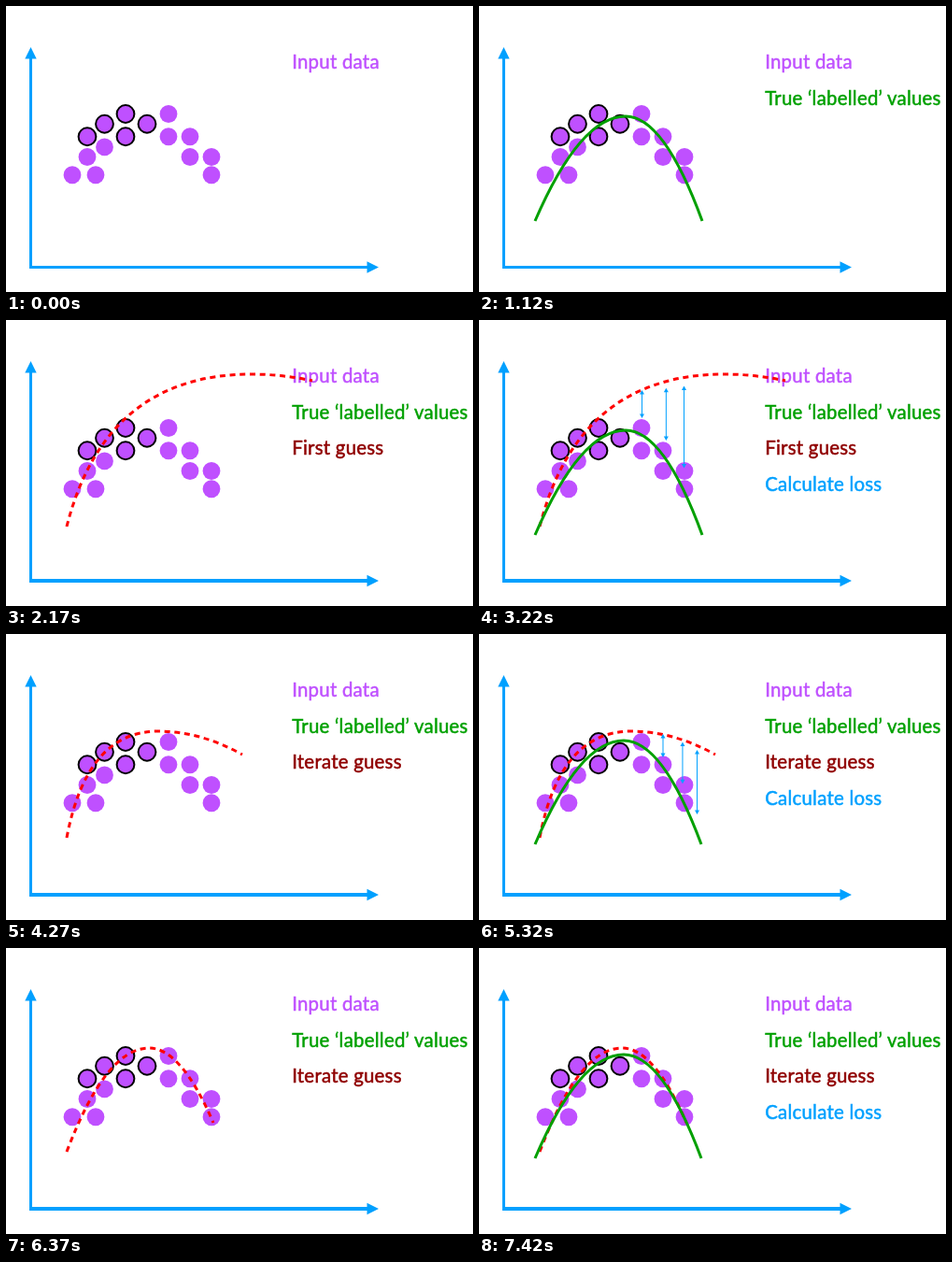
Write an HTML page that moves like this. It is 500 px wide and 306 px high and loops after 8.54 s.

```html
<!DOCTYPE html>
<html lang="en">
<head>
<meta charset="utf-8">
<title>Fitting a curve</title>
<style>
  html, body { margin: 0; width: 100%; height: 100%; overflow: hidden; background: #fff; }
  svg { display: block; width: 100vw; height: 100vh; }
  text { font: 20.4px Lato, sans-serif; letter-spacing: .25px; stroke-width: .5; }
  .curve { fill: none; stroke-width: 3; }
  .guess { stroke: #f00; stroke-dasharray: 6 4.7; }
  .truth { stroke: #00a000; }
</style>
</head>
<body>
<svg id="stage" viewBox="0 0 500 306"></svg>
<script>
const stage = document.getElementById('stage');
const purple = '#bf50ff', green = '#00a000', maroon = '#8f0000', blue = '#00a0ff';
const loop = 8540, stepTime = 1050, lastStep = 7;

const mix = (a, b, t) => a + (b - a) * t;

// Two parabolic halves meeting at the peak; a small lean makes the rise steeper.
function arch([x0, y0], [peakX, peakY], [x1, y1], lean = .5) {
  return `M${x0} ${y0}Q${mix(x0, peakX, lean)} ${peakY} ${peakX} ${peakY}` +
    `Q${mix(peakX, x1, .5)} ${peakY} ${x1} ${y1}`;
}

const truths = [
  arch([60, 230], [157, 118], [239, 230]),
  arch([60, 225], [155, 114], [238, 225])
];
const rounds = [
  { label: 'First guess', guess: arch([65, 221], [263, 58], [328, 65], .21),
    loss: { x: [174.5, 219.5], top: [75, 70.5], length: [30, 88] } },
  { label: 'Iterate guess', guess: arch([65, 218], [163, 104], [253, 129], .22),
    loss: { x: [197, 233.5], top: [107, 124], length: [25, 69] } },
  { label: 'Iterate guess', guess: arch([65, 218], [153, 107], [222, 187], .48) }
];

function dot(x, level) {
  const y = 115.5 + 25.5 * level - 1.25 * level ** 2;
  const outline = x > 80 && x < 160 && y < 145 ? 'stroke="#000" stroke-width="2"' : '';
  return `<circle cx="${x}" cy="${y}" r="9.4" fill="${purple}" ${outline}/>`;
}

// Each column: x, then the levels of its dots
const columns = [[71, 3], [87, 2, 1], [96, 3], [105.5, 1.5, .43], [128, 0, 1], [151, .43]];
for (let i = 0; i < 3; i++) columns.push([174 + 23 * i, i, i + 1]);
const dots = columns.flatMap(([x, ...levels]) => levels.map(level => dot(x, level))).join('');

const curve = (path, kind) => `<path class="curve ${kind}" d="${path}"/>`;

function lossArrow(loss, t) {
  const x = mix(...loss.x, t ** .8);
  const top = mix(...loss.top, t);
  const bottom = top + mix(...loss.length, t ** 1.15);
  return `<path d="M${x} ${top + 3}V${bottom - 3}" stroke="${blue}"/>
    <path d="M${x - 2.5} ${top + 4.5}l2.5-4.5 2.5 4.5zM${x - 2.5} ${bottom - 4.5}l2.5 4.5 2.5-4.5z" fill="${blue}"/>`;
}

function axes(y, width) {
  return `<path d="M26.5 54V${y}" stroke="${blue}" stroke-width="3"/>
    <path d="M25 ${y}H388" stroke="${blue}" stroke-width="${width}"/>
    <path d="M20.3 56.5l6.2-12.5 6.2 12.5zM386.5 ${y - 6.2}l12.5 6.2-12.5 6.2z" fill="${blue}"/>`;
}

function legend(count, label) {
  const entries = [['Input data', purple], ['True ‘labelled’ values', green],
    [label, maroon], ['Calculate loss', blue]];
  return entries.slice(0, count).map(([words, color], i) =>
    `<text x="306.2" y="${66.9 + i * 38.7}" fill="${color}" stroke="${color}">${words}</text>`).join('');
}

// After the opening, even steps show a guess and odd steps compare it with the truth.
function draw(step) {
  const round = rounds[Math.floor(step / 2) - 1];
  const comparing = step % 2 === 1;
  let picture = (round ? axes(279, 4) : axes(279.5, 3)) + dots;
  picture += legend(round ? 3 + step % 2 : step + 1, round?.label);
  if (round) picture += curve(round.guess, 'guess');
  if (comparing) picture += curve(truths[step < 4 ? 0 : 1], 'truth');
  if (comparing && round?.loss) picture += [0, .5, 1].map(t => lossArrow(round.loss, t)).join('');
  stage.innerHTML = picture;
}

let shown;
const origin = performance.now();
function tick() {
  const time = (performance.now() - origin) % loop;
  // The first and last steps are held a little longer than the rest.
  const step = Math.min(lastStep, Math.max(0, Math.floor((time - 70) / stepTime)));
  if (step !== shown) draw(shown = step);
  requestAnimationFrame(tick);
}
tick();
</script>
</body>
</html>
```
